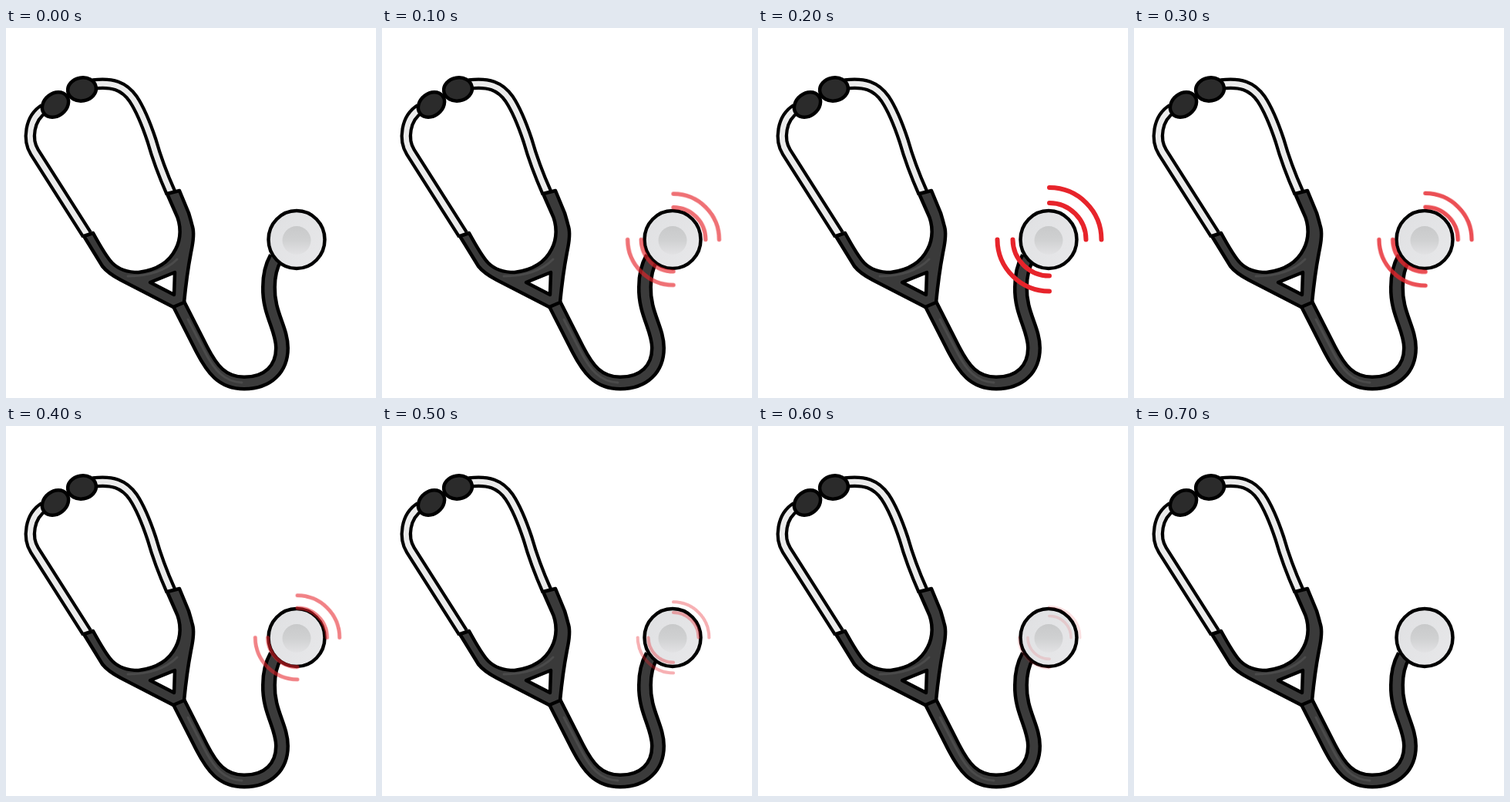
Recreate the animation shown at these times as an HTML page. Size 480 px wide and 480 px high, loop 800 ms.

```html
<!DOCTYPE html>
<html lang="en">
<head>
<meta charset="utf-8">
<title>Stethoscope</title>
<style>
html, body { margin: 0; width: 100%; height: 100%; overflow: hidden; background: #fff; }
svg { display: block; width: 100vw; height: 100vh; }
path, ellipse { stroke-linejoin: round; }
.line { fill: none; }
.edge { stroke: #000; }
.metal { stroke: #ebebeb; stroke-width: 7; }
.rubber { stroke: #3b3b3b; stroke-width: 11; }
.shine { fill: none; stroke: #4b4b4b; stroke-width: 3; stroke-linecap: round; }
.waves {
  fill: none; stroke: #e7242b; stroke-width: 6; stroke-linecap: round;
  transform-origin: 378px 274.5px;
  animation: pulse 800ms step-end infinite;
}
@keyframes pulse {
  0%    { transform: scale(.6);  opacity: 0; }
  12.5% { transform: scale(.88); opacity: .65; }
  25%   { transform: scale(1);   opacity: 1; }
  37.5% { transform: scale(.89); opacity: .8; }
  50%   { transform: scale(.81); opacity: .57; }
  62.5% { transform: scale(.685); opacity: .36; }
  75%   { transform: scale(.59); opacity: .14; }
  87.5%, 100% { transform: scale(.6); opacity: 0; }
}
</style>
</head>
<body>
<svg viewBox="0 0 480 480">
  <defs>
    <path id="left" d="M105 268L37 161C27 145 30 117 49 105"/>
    <path id="right" d="M113 73C138 70 153 75 165 92C175 107 183 128 189 146Q198 178 214 214"/>
    <path id="hose" d="M224 358L254 417C267 442 280 460.500 309 460.500C340 460.500 358 442 358 415C358 390 340 370 341 336Q341 314 350 298"/>
    <linearGradient id="dip" x2="0" y2="1">
      <stop offset="0" stop-color="#c8c9ca"/>
      <stop offset=".5" stop-color="#d0d1d2"/>
      <stop offset="1" stop-color="#e2e2e4"/>
    </linearGradient>
    <linearGradient id="plate" x2="1" y2="1">
      <stop offset="0" stop-color="#dfe0e2"/>
      <stop offset="1" stop-color="#e8e8ea"/>
    </linearGradient>
  </defs>

  <g class="line">
    <use href="#left" class="edge" stroke-width="15.5"/>
    <use href="#left" class="metal"/>
    <use href="#right" class="edge" stroke-width="15.5"/>
    <use href="#right" class="metal"/>
    <use href="#hose" class="edge" stroke-width="20"/>
    <use href="#hose" class="rubber"/>
  </g>
  <path class="shine" d="M236 378L259 422C270 443 283 459 306 460"/>

  <g class="edge" stroke-width="4.5">
    <path fill="#3a3a3a" d="M101 270L125 309Q132 318 149 327L217 362L231 356C233 335 236 312 240 291Q245 268 242 258Q240 250 237 240L225 211L209 215L220 240C228 256 227 274 220 287C212 303 196 314 172 317Q150 317 138 305Q130 297 113 266Z"/>
    <path fill="#fff" d="M187 330L219 317L218 346Z"/>
    <ellipse cx="64" cy="99.500" rx="18.500" ry="14.500" fill="#2b2b2b" transform="rotate(-38 64 99.500)"/>
    <ellipse cx="98.500" cy="79.500" rx="18.500" ry="15" fill="#2b2b2b" transform="rotate(-10 98.500 79.500)"/>
    <ellipse cx="377" cy="274.500" rx="36.500" ry="37.500" fill="url(#plate)"/>
  </g>
  <path class="shine" d="M158 322Q200 322 222 300"/>
  <circle cx="377" cy="275.500" r="18.500" fill="url(#dip)"/>

  <g class="waves">
    <path d="M378 207A67.500 67.500 0 0 1 445.500 274.500"/>
    <path d="M378 227A47.500 47.500 0 0 1 425.500 274.500"/>
    <path d="M310.500 274.500A67.500 67.500 0 0 0 378 341.500"/>
    <path d="M330.500 274.500A47.500 47.500 0 0 0 378 321.500"/>
  </g>
</svg>
</body>
</html>
```
